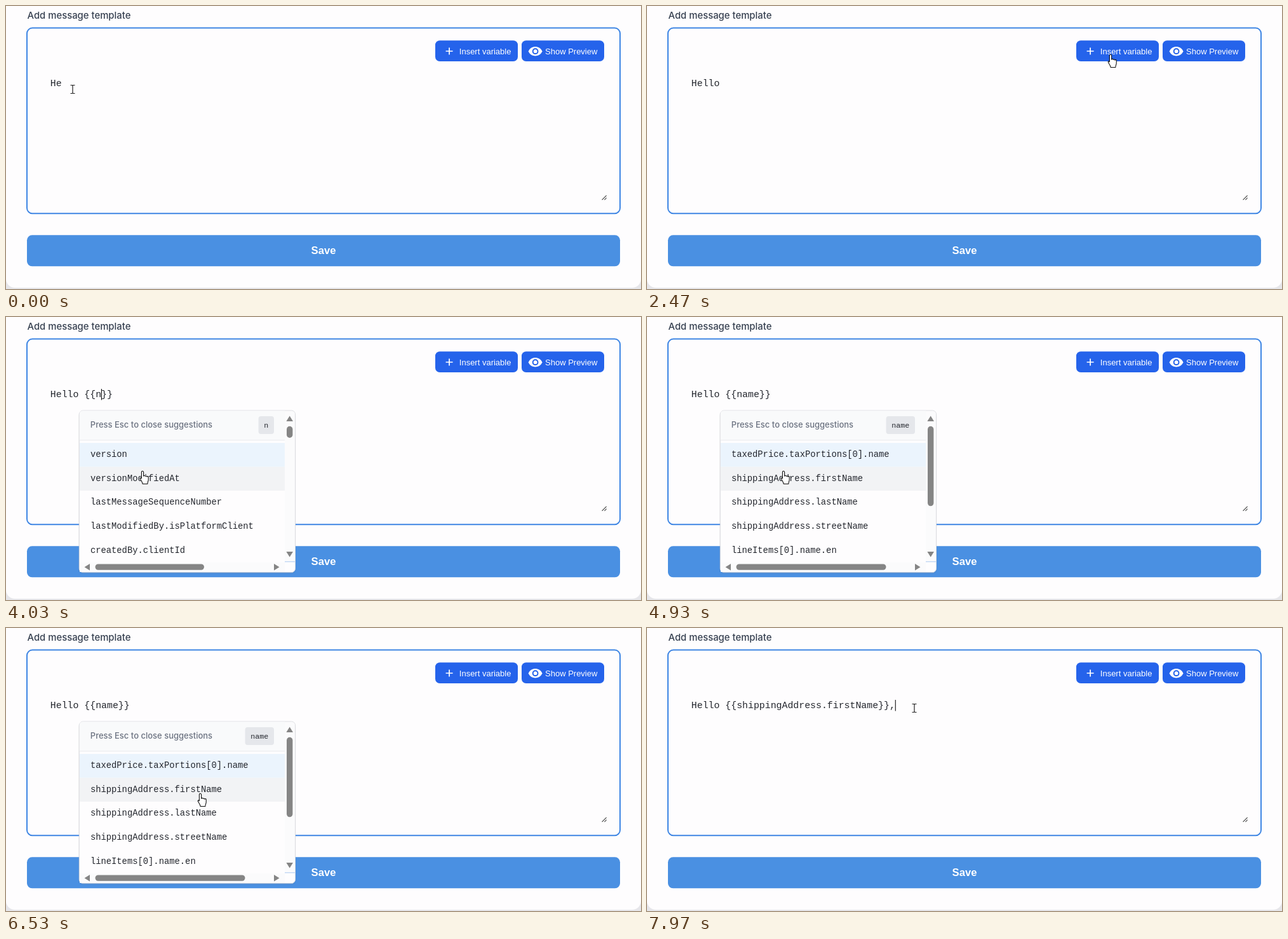
Animation of 1000 by 445 pixels, one loop 8000 ms. Source, as an HTML page:

```html
<!DOCTYPE html>
<html lang="en">
<head>
<meta charset="utf-8">
<title>Message template</title>
<style>
  html, body { margin: 0; width: 100%; height: 100%; overflow: hidden; background: #e6e6ea; }
  svg { display: block; width: 1000px; height: 445px; }
  text { white-space: pre; }
  .inter { font-family: Inter, sans-serif; font-weight: 500; }
  .sans { font-family: "Liberation Sans", Arial, sans-serif; fill: #fff; }
  .mono { font-family: "Courier New", "Liberation Mono", monospace; fill: #23262d; }
  .bar { fill: #858585; }
</style>
</head>
<body>
<svg viewBox="0 0 1000 445">
  <rect y="-30" width="1000" height="473" rx="14" fill="#fefdfe"/>
  <text class="inter" x="33.5" y="20.4" font-size="14.87" fill="#374151">Add message template</text>
  <rect x="33" y="34.6" width="934" height="291.6" rx="8.5" fill="#fefdfe" stroke="#3f86e4" stroke-width="2"/>
  <path d="M938.6 304.8l7-7M942.4 304.8l3.2-3.2" stroke="#444" stroke-width="1.1"/>

  <g fill="#2563eb">
    <rect x="676" y="54.3" width="130" height="32.8" rx="7"/>
    <rect x="812" y="54.3" width="130" height="32.8" rx="7"/>
  </g>
  <path d="M692.6 71h11M698.1 65.5v11" stroke="#fff" stroke-width="1.7"/>
  <path d="M822.8 71.2C826.5 61.6 840.5 61.6 844.4 71.2C840.5 80.8 826.5 80.8 822.8 71.2z" fill="#fff"/>
  <circle cx="833.6" cy="71.2" r="3.9" fill="#fff" stroke="#2563eb" stroke-width="2"/>
  <text class="sans" x="713.8" y="75.7" font-size="13">Insert variable</text>
  <text class="sans" x="849" y="75.7" font-size="13">Show Preview</text>

  <rect x="33" y="360.3" width="934" height="49" rx="8" fill="#4a90e2"/>
  <text class="sans" x="500" y="390.3" font-size="16.72" font-weight="700" text-anchor="middle">Save</text>

  <text id="message" class="mono" x="69.8" y="126.2" font-size="14.87"></text>
  <rect id="caret" y="113" width="1.1" height="17.5" fill="#111"/>

  <g id="popup">
    <rect x="114" y="148" width="342.5" height="256" rx="7" fill="#000" opacity=".05"/>
    <rect x="115.3" y="147" width="340.2" height="254.6" rx="6" fill="#fefdfe" stroke="#dcdde2" stroke-width="1"/>
    <path d="M115.8 193.5V152.5q0-5 5-5H439v46z" fill="#f9fafb"/>
    <path d="M116 193.8h323" stroke="#e8e9ed"/>
    <text class="inter" x="132.8" y="174.3" font-size="13" fill="#6b7280">Press Esc to close suggestions</text>
    <rect id="tagBox" y="156" height="28" rx="4" fill="#e5e7eb"/>
    <text id="tag" class="mono" y="174.2" font-size="11.7"></text>
    <rect x="116" y="198" width="323" height="37.7" fill="#ebf4fd"/>
    <rect id="hover" x="116" width="323" height="37.4" fill="#f2f3f5"/>
    <g id="rows"></g>
    <path d="M439 148h10.5q5.5 0 5.5 5.5V385h-16zM116 386h323v15H116z" fill="#fbfbfc"/>
    <path d="M439 384.8h16" stroke="#aac8f0"/>
    <path d="M119 401.7h333" stroke="#a9bdd8"/>
    <path class="bar" d="M446.7 155.5l5.3 8.5h-10.6zM446.7 377.5l5.3-8.5h-10.6zM123.5 393.2l8.5-5.2v10.4zM430.5 393.2l-8.5-5.2v10.4z"/>
    <rect id="thumbY" class="bar" x="442" y="171.8" width="9.4" rx="4.7"/>
    <rect id="thumbX" class="bar" x="140.5" y="388.4" height="9.4" rx="4.7"/>
  </g>

  <path id="beam" d="M-3.5-6.5h2.7l.8.8.8-.8h2.7M0-6V6M-3.5 6.5h2.7l.8-.8.8.8h2.7" fill="none" stroke="#222" stroke-width="1.2"/>
  <path id="hand" d="M-1.6 .9a1.6 1.6 0 0 1 3.2 0V7.2a1.4 1.4 0 0 1 2.7.3a1.4 1.4 0 0 1 2.5.7a1.3 1.3 0 0 1 2.4.9V13c0 2-1.2 3-1.4 6.5H.2C0 16.5-2 15-3.6 11.6c-.6-1.6.8-2.4 2-.8z" fill="#fff" stroke="#111" stroke-width="1.1" stroke-linejoin="round"/>
</svg>
<script>
const LOOP = 8000, BLINK = 540, CHAR = 8.92, ROW = 37.7, LIST_TOP = 198;
const $ = id => document.getElementById(id);

const lists = {
  all: ["type", "id", "version", "versionModifiedAt", "lastMessageSequenceNumber"],
  n: ["version", "versionModifiedAt", "lastMessageSequenceNumber",
      "lastModifiedBy.isPlatformClient", "createdBy.clientId"],
  name: ["taxedPrice.taxPortions[0].name", "shippingAddress.firstName", "shippingAddress.lastName",
         "shippingAddress.streetName", "lineItems[0].name.en"]
};
const filled = "Hello {{shippingAddress.firstName}}";

// time, message, caret index, suggestion list, query
const edits = [
  [-600, "He", 2],
  [230, "Hel", 3],
  [400, "Hell", 4],
  [570, "Hello", 5],
  [785, "Hello ", 6],
  [2830, "Hello {{}}", 8, "all", ""],
  [3850, "Hello {{n}}", 9, "n", "n"],
  [4110, "Hello {{na}}", 10, "name", "na"],
  [4250, "Hello {{nam}}", 11, "name", "nam"],
  [4380, "Hello {{name}}", 12, "name", "name"],
  [6720, filled, 35],
  [7740, filled + ",", 36]
];

// start, end, destination of the pointer
const start = [105, 131];
const moves = [
  [1400, 2150, 730, 77],
  [3000, 3600, 215, 243],
  [5150, 5900, 306, 261],
  [6850, 7450, 421, 126]
];

const set = (id, attrs) => {
  for (const key in attrs) $(id).setAttribute(key, attrs[key]);
};
const show = (id, on) => set(id, { visibility: on ? "visible" : "hidden" });
const ease = p => p * p * (3 - 2 * p);

const rows = lists.n.map((_, i) => {
  const row = document.createElementNS($("rows").namespaceURI, "text");
  row.setAttribute("class", "mono");
  row.setAttribute("x", 132.9);
  row.setAttribute("y", 220 + i * ROW);
  row.setAttribute("font-size", 13.82);
  return $("rows").appendChild(row);
});

function pointerAt(t) {
  let [x, y] = start;
  for (const [from, to, tx, ty] of moves) {
    const p = ease(Math.min(1, Math.max(0, (t - from) / (to - from))));
    x += (tx - x) * p;
    y += (ty - y) * p;
  }
  return [x, y];
}

function drawPopup(list, query, row) {
  const width = query.length * 7.02 + 17.4;
  const named = list === "name";
  lists[list].forEach((label, i) => { rows[i].textContent = label; });
  $("tag").textContent = query;
  set("tag", { x: 422 - width + 8.7 });
  set("tagBox", { x: 422 - width, width: query ? width : 0 });
  set("thumbY", { height: named ? 125.5 : 18.2 });
  set("thumbX", { width: named ? 236 : 171.5 });
  set("hover", { y: LIST_TOP + row * ROW, opacity: row > 0 ? 1 : 0 });
}

function draw(t) {
  const [time, message, caret, list, query] = edits.filter(e => e[0] <= t).pop();
  $("message").textContent = message;
  set("caret", { x: 69.6 + caret * CHAR });
  show("caret", (t - time) % (2 * BLINK) < BLINK);

  const [x, y] = pointerAt(t);
  const inList = list && x > 116 && x < 439 && y > LIST_TOP && y < 385;
  const onButton = x > 676 && x < 942 && y > 54 && y < 87;
  const hand = inList || onButton;
  $("popup").style.display = list ? "" : "none";
  if (list) drawPopup(list, query, inList ? Math.floor((y - LIST_TOP) / ROW) : -1);

  for (const id of ["hand", "beam"]) {
    set(id, { transform: `translate(${x} ${y})` });
    show(id, (id === "hand") === Boolean(hand));
  }
}

const origin = performance.now();
function tick() {
  draw((performance.now() - origin) % LOOP);
  requestAnimationFrame(tick);
}
tick();
</script>
</body>
</html>
```
